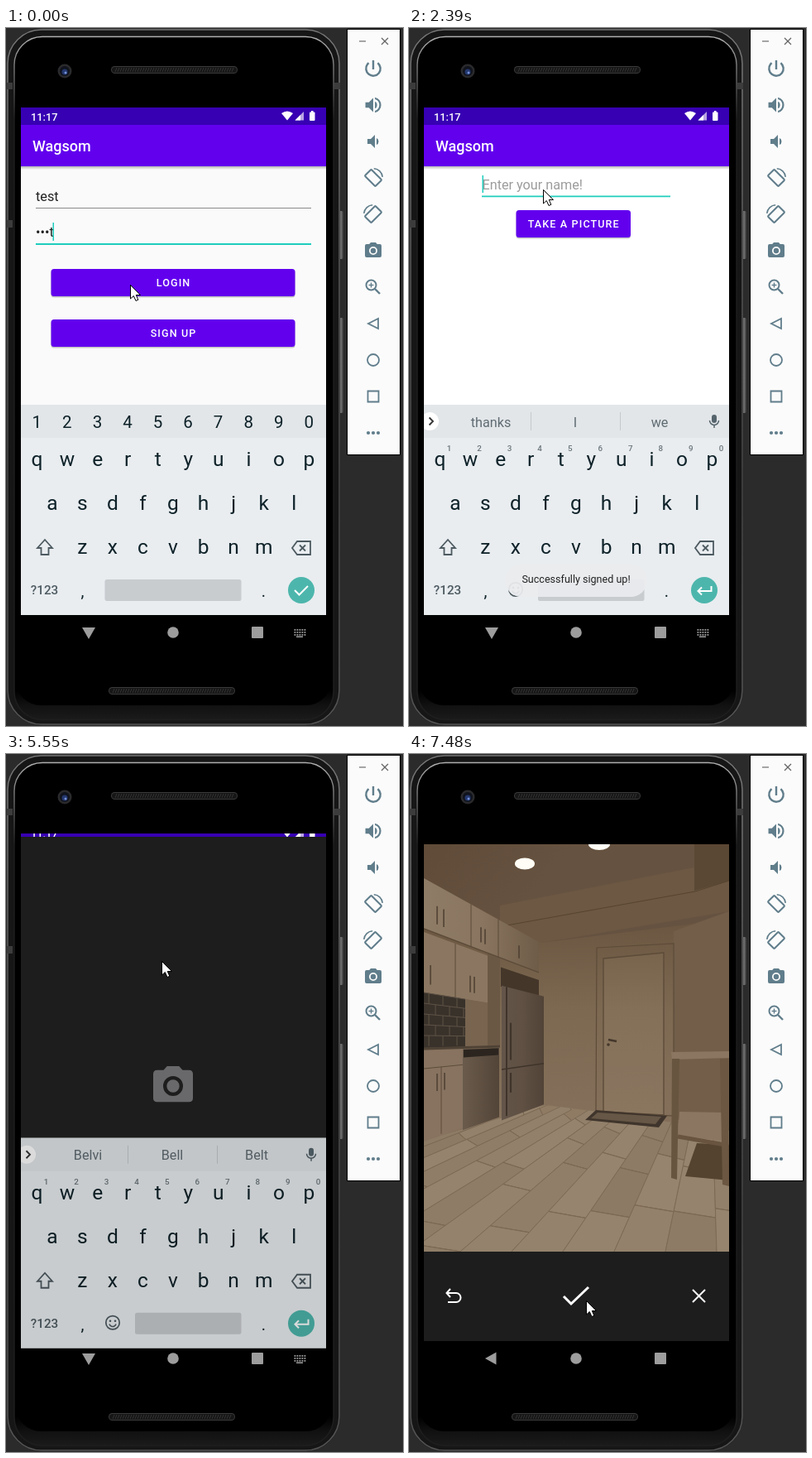
An HTML page with a canvas that plays this animation: 480x843 px, repeating every 8000 ms.

```html
<!DOCTYPE html>
<html lang="en">
<head>
<meta charset="utf-8">
<title>Phone sign-up demo</title>
<style>
html, body { margin: 0; width: 100%; height: 100%; overflow: hidden; background: #2b2b2b; }
canvas { display: block; }
</style>
</head>
<body>
<canvas id="stage" width="480" height="843"></canvas>
<script>
const ctx = document.getElementById('stage').getContext('2d');
const LOOP = 8000, FRAME = 1000 / 7.5, FIRST_FRAME = 50;
const APP = 'Wagsom', NAME = 'Belvi', DIGITS = '1234567890';
const PURPLE = '#6200ee', TEAL = '#1fcdbd', SLATE = '#607d8b', KEY = '#0e2229';
const PITCH = 36.55, KEYBOARD_TRAVEL = 300;

// Each pointer move: arrival time and place.
const MOVES = [[330, 161, 366], [1940, 162, 195], [4900, 188, 250], [6150, 213, 638], [6700, 214, 660]];

const CAMERA = new Path2D('M9 2L7.2 4H4Q2 4 2 6V18Q2 20 4 20H20Q22 20 22 18V6Q22 4 20 4H16.8L15 2ZM12 17A5 5 0 1 1 12 7A5 5 0 1 1 12 17ZM12 15.2A3.2 3.2 0 1 0 12 8.8A3.2 3.2 0 1 0 12 15.2Z');
const SPEAKER = 'M3 9V15H7L12 20V4L7 9ZM14 8V16Q16.5 15 16.5 12Q16.5 9 14 8Z';
const LOUD = new Path2D(SPEAKER + 'M14 3.2V5.3A7 7 0 0 1 14 18.7V20.8A9 9 0 0 0 14 3.2Z');
const QUIET = new Path2D(SPEAKER);

// Cuts happen at once; motion is sampled at the recording's frame rate.
const frameTime = t => FIRST_FRAME + Math.floor((t - FIRST_FRAME) / FRAME) * FRAME;
const ramp = (t, from, to) => Math.max(0, Math.min(1, (frameTime(t) - from) / (to - from)));
const smooth = p => p * p * (3 - 2 * p);
const caretOn = (t, since) => (t - since) % 940 < 470;

function rect(x, y, w, h, color, r = 0) {
  ctx.fillStyle = color;
  ctx.beginPath();
  ctx.roundRect(x, y, w, h, r);
  ctx.fill();
}
function frame(x, y, w, h, color, r, width) {
  ctx.strokeStyle = color;
  ctx.lineWidth = width;
  ctx.beginPath();
  ctx.roundRect(x, y, w, h, r);
  ctx.stroke();
}
function disc(x, y, rx, color, ry = rx) {
  ctx.fillStyle = color;
  ctx.beginPath();
  ctx.ellipse(x, y, rx, ry, 0, 0, 7);
  ctx.fill();
}
function ring(x, y, r, color, width, from = 0, to = 2 * Math.PI) {
  ctx.strokeStyle = color;
  ctx.lineWidth = width;
  ctx.beginPath();
  ctx.arc(x, y, r, from, to);
  ctx.stroke();
}
function trace(points) {
  ctx.beginPath();
  for (let i = 0; i < points.length; i += 2) ctx.lineTo(points[i], points[i + 1]);
}
function poly(color, ...points) {
  trace(points);
  ctx.fillStyle = color;
  ctx.fill();
}
function line(color, width, ...points) {
  trace(points);
  ctx.strokeStyle = color;
  ctx.lineWidth = width;
  ctx.stroke();
}
const outline = (color, width, ...points) => line(color, width, ...points, ...points.slice(0, 4));
function cross(x, y, r, color, width) {
  line(color, width, x - r, y - r, x + r, y + r);
  line(color, width, x - r, y + r, x + r, y - r);
}
function text(s, x, y, size, color, { align = 'left', weight = 400, spacing = 0 } = {}) {
  ctx.font = `${weight} ${size}px Roboto, sans-serif`;
  ctx.letterSpacing = spacing + 'px';
  ctx.textAlign = align;
  ctx.fillStyle = color;
  ctx.fillText(s, x + (align === 'center' ? spacing / 2 : 0), y);
}
function layer({ x = 0, y = 0, alpha = 1, clip }, paint) {
  ctx.save();
  if (clip) {
    ctx.beginPath();
    ctx.rect(...clip);
    ctx.clip();
  }
  ctx.translate(x, y);
  ctx.globalAlpha *= alpha;
  paint();
  ctx.restore();
}
function icon(path, x, y, scale, color) {
  layer({ x, y }, () => {
    ctx.scale(scale, scale);
    ctx.translate(-12, -12);
    ctx.fillStyle = color;
    ctx.fill(path);
  });
}
function gradient(x0, y0, x1, y1, ...colors) {
  const g = ctx.createLinearGradient(x0, y0, x1, y1);
  colors.forEach((c, i) => g.addColorStop(i / (colors.length - 1), c));
  return g;
}
function dots(x, y, gap, r, color) {
  for (const i of [-1, 0, 1]) disc(x + i * gap, y, r, color);
}

function grille(x, y) {
  rect(x, y, 153, 9, '#3a3a3a', 4.5);
  rect(x + 1, y + 1, 151, 7, '#161616', 3.5);
  for (let i = 5; i < 149; i += 3) line('#343434', 1, x + i, y + 7, x + i + 2, y + 2);
}

function device() {
  rect(0, 0, 480, 843, '#2b2b2b');
  for (const [y, h] of [[221, 58], [350, 115]])
    rect(402, y, 6, h, gradient(402, 0, 408, 0, '#222', '#777', '#333'), 2);
  rect(1, 1, 403, 841, '#161616', 42);
  frame(2, 2, 401, 839, gradient(0, 2, 0, 841, '#777', '#555', '#444', '#555'), 41, 1.6);
  for (const x of [1, 397]) rect(x, 66, 7, 8, '#3c3c3c');
  rect(1, 232, 7, 9, '#3c3c3c');
  rect(10, 10, 386, 826, gradient(0, 800, 0, 836, '#000', '#111', '#1b1b1b'), 35);
  frame(10, 10.5, 386, 825, gradient(0, 10, 0, 110, '#b0b0b0', '#1e1e1e'), 34, 1.4);
  rect(12, 14, 381, 804, '#000', 30);
  grille(127, 46);
  grille(124, 796);
  disc(71, 52, 8.5, '#2a2a2c');
  disc(71, 52, 6, '#10131c');
  disc(71, 53, 3.5, '#24386e');
  disc(72, 54, 1.5, '#7590d8');
}

function toolbar() {
  const x = 444, rowY = i => 49 + 44 * i;
  rect(412, 1, 65, 515, '#000');
  rect(413, 2, 63, 513, '#fbfbfb');
  line('#777', 1.3, 427, 16, 435, 16);
  cross(458, 16, 4, '#666', 1.3);
  ring(x, rowY(0), 8.7, SLATE, 2.4, -0.9, Math.PI + 0.9);
  line(SLATE, 2.4, x, 39, x, 50);
  icon(LOUD, x, rowY(1), 1.05, SLATE);
  icon(QUIET, x + 2, rowY(2), 1, SLATE);
  for (const flip of [1, -1]) layer({ x, y: rowY(3.5 - flip / 2) }, () => {
    ctx.scale(flip, 1);
    ring(0, 0, 11.3, SLATE, 1.6, -1.5, -0.1);
    ctx.rotate(Math.PI / 4);
    frame(-9, -5.5, 18, 11, SLATE, 1, 2);
  });
  icon(CAMERA, x, rowY(5), 1, SLATE);
  ring(x - 2.5, rowY(6) - 2.5, 6, SLATE, 2);
  line(SLATE, 2.4, x + 2, rowY(6) + 2, x + 8, rowY(6) + 8);
  line(SLATE, 1.4, x - 5.5, 310.5, x + 0.5, 310.5);
  line(SLATE, 1.4, x - 2.5, 307.5, x - 2.5, 313.5);
  outline(SLATE, 1.8, 438, 357, 450, 351, 450, 363);
  ring(x, rowY(8), 7, SLATE, 1.8);
  frame(437.5, 438.5, 13, 13, SLATE, 0, 1.8);
  dots(x, rowY(10), 6, 2.1, SLATE);
}

function statusBar() {
  rect(18, 96, 369, 21, '#3700b3');
  text('11:17', 30, 111.5, 12.8, '#fff', { weight: 500 });
  ctx.fillStyle = '#fff';
  ctx.fill(new Path2D('M333 103Q340 98 347 103L340 111.5Z'));
  poly('#b9a5e4', 360, 101, 360, 111.5, 349.5, 111.5);
  poly('#fff', 356, 105, 356, 111.5, 349.5, 111.5);
  rect(367, 101.5, 6.5, 10.5, '#fff', 1);
  rect(369, 100, 2.5, 2, '#fff');
}

function appBar(background) {
  rect(18, 117, 369, 592, background);
  rect(18, 167, 369, 4, gradient(0, 167, 0, 171, 'rgba(0,0,0,.28)', 'rgba(0,0,0,0)'));
  rect(18, 116, 369, 51, PURPLE);
  text(APP, 32, 149, 18, '#fff', { weight: 500 });
}

function button(label, x, y, w, rippleX, ripple) {
  rect(x, y + 1.5, w, 33, 'rgba(0,0,0,.22)', 3.5);
  rect(x, y, w, 33, PURPLE, 3.5);
  if (ripple > 0 && ripple < 1) layer({ clip: [x, y, w, 33] }, () =>
    disc(rippleX, y + 17, 60 + w * 1.1 * ripple, `rgba(255,255,255,${0.26 * (1 - ripple * 0.5)})`));
  text(label, x + w / 2, y + 21, 12.57, '#fff', { align: 'center', weight: 500, spacing: 1.12 });
}

function loginPage(t) {
  appBar('#fafafa');
  text('test', 36, 209, 16.3, '#212121');
  rect(36, 217, 333, 1, '#8a8a8a');
  text('•••t', 36, 252, 16.3, '#212121');
  rect(36, 260, 333, 2, TEAL);
  if (caretOn(t, 110)) rect(56.5, 235, 1.5, 22, TEAL);
  button('LOGIN', 54.5, 291, 295, 0, 0);
  button('SIGN UP', 54.5, 352, 295, 165, ramp(t, 780, 1160));
}

const typedName = t => NAME.slice(0, Math.max(0, 1 + Math.floor((t - 3230) / 97)));

function namePage(t) {
  appBar('#fff');
  const typed = typedName(t), focused = t >= 2090;
  text(typed || 'Enter your name!', 88.5, 195, 16.2, typed ? '#212121' : '#9c9c9c');
  const width = typed ? ctx.measureText(typed).width : 0;
  rect(88.5, 197, width, 1, '#333');
  rect(88, 202.5, 228, focused ? 1.8 : 1, focused ? TEAL : '#8a8a8a');
  if (t >= 2240 && caretOn(t, typed ? 3620 : 2240)) rect(88.5 + width, 178, 1.5, 21, TEAL);
  button('TAKE A PICTURE', 129.5, 220, 138.5, 188, ramp(t, 4900, 5250));
}

function keyRow(keys, x, y, size, color = KEY, weight = 400) {
  [...keys].forEach((key, i) => text(key, x + PITCH * i, y, size, color, { align: 'center', weight }));
}

function suggestions(t) {
  const typed = typedName(t);
  const words = typed ? [typed, 'Bell', 'Belt'] : ['thanks', 'I', 'we'];
  disc(25, 475, 11, '#fff');
  line('#333', 1.8, 24.5, 470.5, 29, 475, 24.5, 479.5);
  words.forEach((word, i) => text(word, 99 + 102 * i, 481.5, 16.2, '#5f6b72', { align: 'center' }));
  for (const x of [147, 255]) rect(x, 464, 1, 22, '#c4c9cc');
  rect(366, 467, 6, 10, '#56656d', 3);
  ring(369, 474, 5.5, '#56656d', 1.5, 0, Math.PI);
  line('#56656d', 1.5, 369, 479, 369, 483);
}

function keyboard(t, password) {
  const gray = '#4d5a61';
  rect(18, 455, 369, 254, '#e9edf0');
  rect(18, 455, 369, 40, '#e2e6e9');
  if (password) keyRow(DIGITS, 37.3, 483, 20.5);
  else {
    suggestions(t);
    keyRow(DIGITS, 48.5, 511, 9.8, '#6b767c', 500);
  }
  ['qwertyuiop', 'asdfghjkl', 'zxcvbnm'].forEach((keys, i) =>
    keyRow(keys, 202 - PITCH * (keys.length - 1) / 2, 529 + 53 * i, 24.5));
  outline(gray, 1.8, 47, 618, 56, 628, 51.5, 628, 51.5, 636, 42.5, 636, 42.5, 628, 38, 628);
  outline(gray, 1.8, 346, 628, 352, 620, 368, 620, 368, 636, 352, 636);
  cross(358.5, 628, 3.5, gray, 1.8);
  text('?123', 46.5, 684, 15.2, gray, { align: 'center', weight: 500 });
  text(',', 92.5, 687, 20, KEY, { align: 'center' });
  text('.', 311.5, 687, 20, KEY, { align: 'center' });
  const space = password ? 119.5 : 156;
  rect(space, 666, 284.5 - space, 26, '#c8cccf', 2.5);
  disc(357, 679, 16, '#4db6ac');
  if (password) line('#fff', 2, 349, 679, 354.5, 684.5, 365, 674);
  else {
    ring(129, 678, 8.2, gray, 1.7);
    for (const x of [126, 132]) disc(x, 676, 1.3, gray);
    ring(129, 678.5, 4.2, gray, 1.6, 0.3, 2.84);
    line('#fff', 2, 365.5, 674, 365.5, 680, 350, 680);
    line('#fff', 2, 354, 675.5, 349.5, 680, 354, 684.5);
  }
}

function keyboardDrop(t) {
  if (t < 2240) return KEYBOARD_TRAVEL * ramp(t, 1280, 1800) ** 2;
  if (t < 2390) return KEYBOARD_TRAVEL;
  return t < 5550 ? 0 : KEYBOARD_TRAVEL * ramp(t, 5496, 5617) ** 2;
}

function navBar(keyboardOpen) {
  const gray = '#9d9d9d';
  if (keyboardOpen) {
    poly(gray, 92, 724, 108, 724, 100, 738);
    for (let i = 0; i < 15; i++) rect(348.5 + i % 5 * 3, 726 + Math.floor(i / 5) * 3, 1.8, 1.8, gray);
    rect(351, 734.5, 8, 1.5, gray);
  } else poly(gray, 92, 730, 105.5, 722.5, 105.5, 737.5);
  disc(202, 730, 6.8, gray);
  rect(297, 723, 14, 14, gray, 1);
}

function toast(alpha) {
  layer({ alpha }, () => {
    rect(116, 647, 172, 40, 'rgba(235,236,238,.93)', 20);
    text('Successfully signed up!', 202, 670, 12.57, '#222', { align: 'center' });
  });
}

// Planks run toward one vanishing point; seeded noise picks tone and cut positions.
function floor() {
  const farX = 364, farY = 340;
  let seed = 7;
  const random = () => (seed = seed * 16807 % 2147483647) / 2147483647;
  const at = (x, y) => [farX + (x - farX) * (y - farY) / (601 - farY), y];
  ctx.save();
  trace([18, 467, 165, 424, 228, 432, 387, 455, 387, 601, 18, 601]);
  ctx.clip();
  rect(18, 420, 369, 181, '#8f7b64');
  for (let x = -1240; x < 560; x += 62) {
    for (let y = 405 + random() * 30; y < 640;) {
      const next = y + (y - farY) * (0.3 + random() * 0.3);
      const tone = random() * 10;
      const quad = [...at(x, y), ...at(x + 62, y + 8), ...at(x + 62, next + 8), ...at(x, next)];
      poly(`rgb(${140 + tone},${122 + tone},${100 + tone})`, ...quad);
      outline('#7c6954', 0.9, ...quad);
      y = next;
    }
  }
  ctx.restore();
}

// Left wall in perspective: heights are given where the wall meets the screen edge.
const wallY = (x, h) => 345 + (h - 345) * (370 - x) / 352;
const panel = (x0, x1, h0, h1, color) =>
  poly(color, x0, wallY(x0, h0), x1, wallY(x1, h0), x1, wallY(x1, h1), x0, wallY(x0, h1));
const wallLine = (x0, h0, x1, h1, color, width) =>
  line(color, width, x0, wallY(x0, h0), x1, wallY(x1, h1));
function handles(h, length, ...xs) {
  for (const x of xs) wallLine(x, h, x, h + length, '#4c3e31', 1.5);
}

function kitchenUnits() {
  const edge = '#5d4b39', dark = '#3f342a';
  panel(18, 157, 150, 211, gradient(18, 0, 157, 0, '#8f7c66', '#8a7660', '#6f5c48'));
  panel(18, 95, 215, 288, '#8b7761');
  panel(68, 110, 288, 355, '#78644f');
  panel(95, 110, 211, 355, '#6b5844');
  wallLine(18, 211, 157, 211, edge, 1.5);
  for (const x of [75, 108]) wallLine(x, 150, x, 211, edge, 1);
  wallLine(56, 215, 56, 288, edge, 1);
  handles(176, 23, 34, 42, 87, 92, 133);
  handles(253, 24, 26, 74, 79);

  panel(18, 68, 288, 355, '#39322b');
  for (let row = 0; row < 5; row++) {
    const h = 288 + row * 13;
    wallLine(18, h, 68, h, '#5e5245', 1);
    for (let x = 24 + row % 2 * 8; x < 68; x += 17) wallLine(x, h, x, h + 13, '#5e5245', 1);
  }
  panel(18, 65, 358, 468, '#877360');
  wallLine(18, 380, 65, 380, edge, 1);
  wallLine(39, 380, 39, 466, edge, 1);
  handles(388, 22, 34, 43);
  wallLine(18, 356, 110, 356, '#4e4235', 3);
  panel(65, 109, 358, 471, gradient(65, 0, 110, 0, '#6a5b4c', '#524437'));
  panel(66, 108, 359, 370, '#2c251f');

  panel(111, 157, 226, 258, '#443629');
  panel(112, 163, 256, 478, gradient(112, 0, 163, 0, '#64554a', '#5f5043', '#514337'));
  wallLine(112, 394, 163, 394, dark, 1.5);
  wallLine(118, 256, 118, 474, dark, 2);
  wallLine(123, 316, 123, 380, dark, 2.2);
  wallLine(123, 402, 123, 436, dark, 2.2);
}

function kitchen() {
  const edge = '#5d4b39';
  rect(18, 109, 369, 492, gradient(0, 190, 0, 430, '#69553f', '#7d6952', '#84705a'));
  poly(gradient(18, 109, 120, 200, '#5f4b38', '#665240'), 18, 109, 387, 109, 387, 200, 160, 228, 110, 205, 18, 152);
  poly('#6c5843', 110, 183, 345, 137, 345, 165, 387, 153, 387, 190, 160, 228, 110, 207);
  poly('#5a4734', 345, 109, 387, 109, 387, 153, 345, 165);
  line('#57442f', 1, 118, 207, 346, 166, 387, 153);
  poly('#725e49', 320, 214, 387, 190, 387, 460, 320, 440);
  floor();
  kitchenUnits();

  outline(edge, 1.2, 226, 432, 227, 234, 320, 229, 320, 437);
  poly('rgba(255,230,190,.05)', 235, 247, 308, 240, 308, 436, 235, 432);
  outline(edge, 1.4, 235, 247, 308, 240, 308, 436, 235, 432);
  line('#44372b', 2.5, 241, 345, 251, 347);
  disc(241, 351, 1.8, '#44372b');
  poly('#40352c', 226, 430, 312, 437, 302, 451, 213, 442);
  poly('#665746', 228, 433, 305, 438, 298, 447, 220, 440);

  poly('#54432f', 348, 470, 387, 472, 387, 515, 334, 510);
  poly('#8b7761', 327, 432, 378, 433, 380, 467, 325, 462);
  line('#68543f', 5, 325, 462, 382, 472);
  poly('#8b7761', 317, 360, 387, 359, 387, 367, 318, 369);
  poly('#68553f', 318, 368, 327, 368, 324, 514, 317, 512);
  poly('#6b5742', 376, 368, 386, 368, 387, 522, 379, 520);
  disc(140, 132.5, 12, '#fffdf5', 7);
  disc(230, 109, 13, '#fffdf5', 7);
}

function cameraApp(t) {
  rect(18, 96, 369, 613, '#1d1d1d');
  if (t < 5670) layer({ y: -11, clip: [18, 96, 369, 4] }, statusBar);
  else rect(18, 96, 369, 13, '#000');
  if (t < 5820) return icon(CAMERA, 202, 401, 2.4, '#69696b');

  layer({ clip: [18, 109, 369, 492], alpha: ramp(t, 5650, 6180) }, kitchen);
  layer({ alpha: ramp(t, 5650, 6050) * (1 - ramp(t, 6720, 6950)) }, () => {
    icon(CAMERA, 202, 653.5, 1.8, '#fff');
    disc(354, 568, 21.5, 'rgba(90,75,60,.65)');
    dots(354, 568, 5.5, 2, '#fff');
  });
  layer({ alpha: ramp(t, 6950, 7200) }, () => {
    line('#fff', 3, 187, 655, 196, 664, 217, 644);
    cross(350.5, 654.5, 7.5, '#fff', 2);
    line('#fff', 2, 50, 646, 45.5, 651, 50, 656);
    line('#fff', 2, 46, 651, 57, 651);
    ring(57, 656.5, 5.5, '#fff', 2, -Math.PI / 2, Math.PI / 2);
    line('#fff', 2, 57, 662, 47, 662);
  });
}

function pages(t) {
  if (t < 1700) {
    const dim = 0.032 * ramp(t, 1010, 1250) + 0.1 * ramp(t, 1280, 1580);
    layer({ y: t < 1160 ? 0 : t < 1430 ? -1 : -9 }, () => loginPage(t));
    rect(18, 116, 369, 593, `rgba(0,0,0,${dim})`);
    statusBar();
  }
  if (t >= 1430 && t < 5550) {
    const hidden = (1 - ramp(t, 1250, 1700)) ** 2;
    const top = 96 + 613 * hidden;
    layer({ clip: [18, top, 369, 709 - top] }, () => {
      layer({ y: t < 5270 ? 25 * hidden : -1 }, () => namePage(t));
      statusBar();
    });
  }
  if (t >= 5550) cameraApp(t);
}

function pointer(t) {
  let x = 150, y = 310;
  for (const [arrival, toX, toY] of MOVES) {
    const p = smooth(ramp(t, arrival - 350, arrival));
    x += (toX - x) * p;
    y += (toY - y) * p;
  }
  const shape = [0, 0, 0, 16.5, 3.8, 13, 6.5, 19, 9.3, 17.8, 6.8, 12, 12, 12];
  layer({ x: x + 0.5, y: y + 0.5 }, () => {
    poly('#fff', ...shape);
    outline('#000', 1, ...shape);
  });
}

function draw(t) {
  device();
  toolbar();
  layer({ clip: [18, 96, 369, 655] }, () => {
    pages(t);
    rect(18, 709, 369, 42, '#000');
    layer({ y: keyboardDrop(t) }, () => {
      keyboard(t, t < 1820);
      if (t >= 5550) rect(18, 455, 369, 254, 'rgba(0,0,0,.14)');
    });
    navBar(t < 1430 || t >= 2240 && t < 5670);
    if (t >= 1820 && t < 3470) toast(1 - ramp(t, 2960, 3350));
  });
  pointer(t);
}

function tick(now) {
  draw(now % LOOP);
  requestAnimationFrame(tick);
}
requestAnimationFrame(tick);
</script>
</body>
</html>
```
